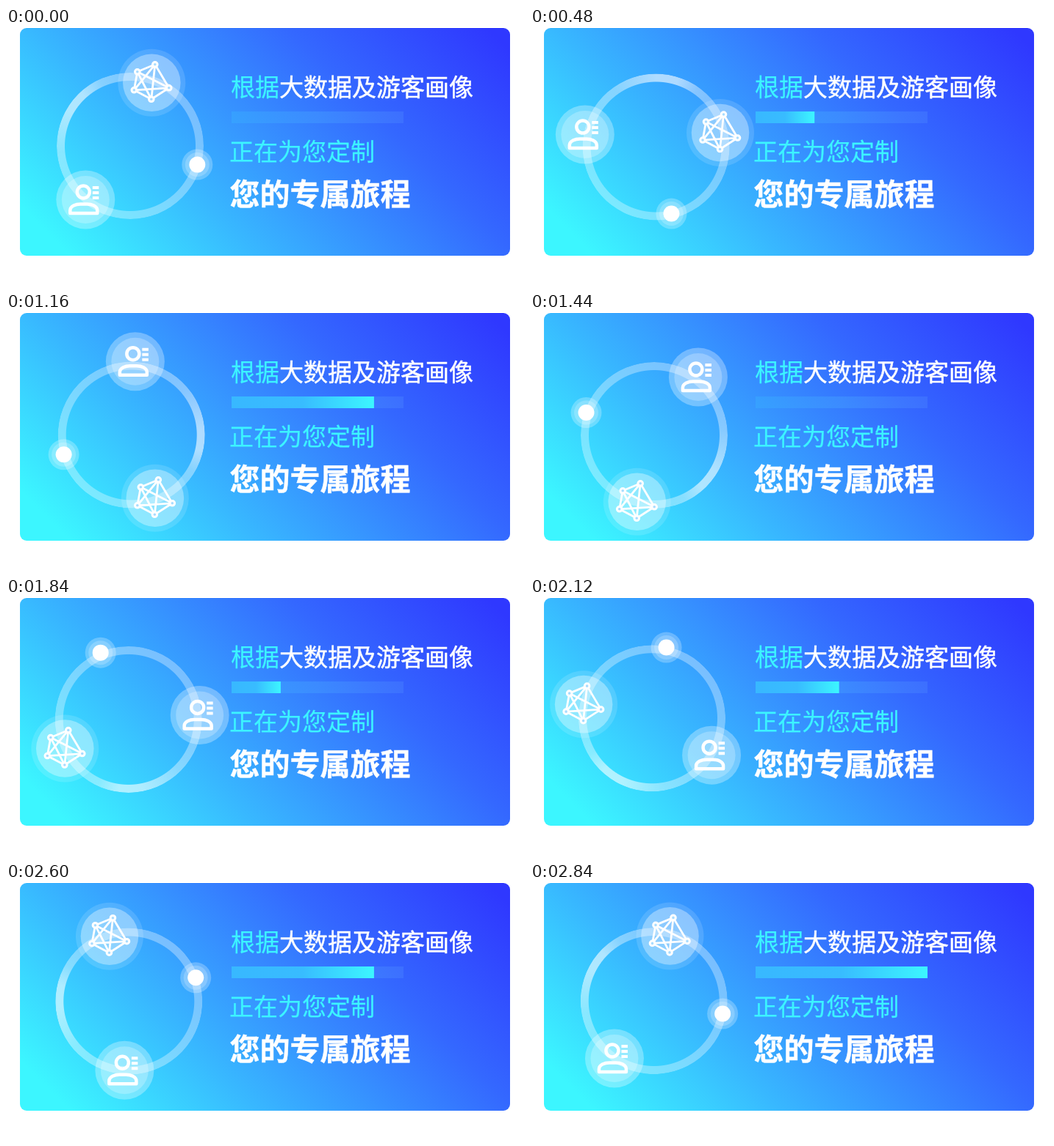
Write an HTML page that moves like this. It is 705x351 px and loops after 2880 ms.

```html
<!DOCTYPE html>
<html lang="zh">
<head>
<meta charset="utf-8">
<style>
  html, body { margin: 0; width: 100%; height: 100%; overflow: hidden; background: #fff; }
  #stage { position: relative; width: 705px; height: 351px; overflow: hidden; }
  #card {
    position: absolute; left: 19px; top: 0; width: 667px; height: 311px; border-radius: 9px;
    background: linear-gradient(45deg, #3cf6ff 7%, #38b8ff 33%, #3468ff 69%, #2f38ff 97%);
  }
  #ring {
    position: absolute; left: 68.5px; top: 60.5px; width: 200px; height: 200px;
    border-radius: 50%; transform-origin: 100px 103px;
    background: conic-gradient(#fff5 0 225deg, #fff6 265deg, #fff9 300deg, #fff9 318deg, #fff6 335deg, #fff5);
    -webkit-mask: radial-gradient(circle, #0000 88.5px, #000 89.5px);
    mask: radial-gradient(circle, #0000 88.5px, #000 89.5px);
  }
  svg { position: absolute; left: 0; top: 0; }
  text {
    font-family: "Noto Sans CJK SC", "Noto Sans CJK", "Noto Sans CJK JP", sans-serif;
    font-size: 33px; fill: #fff; stroke: #fff; stroke-width: .5px;
  }
  .cyan { fill: #3cf4ff; stroke: #3cf4ff; stroke-width: .25px; }
  .title { font-size: 41px; font-weight: 700; }
  .line { fill: none; stroke: #fff; stroke-linejoin: round; }
</style>
</head>
<body>
<div id="stage">
  <div id="card"></div>
  <div id="ring"></div>
  <svg width="705" height="351" viewBox="0 0 705 351">
    <defs>
      <linearGradient id="track">
        <stop offset="0" stop-color="#38b8ff" stop-opacity=".32"/>
        <stop offset=".5" stop-color="#48a8ff" stop-opacity=".36"/>
        <stop offset="1" stop-color="#508cff" stop-opacity=".32"/>
      </linearGradient>
      <linearGradient id="fill">
        <stop offset="0" stop-color="#38b8ff"/>
        <stop offset=".5" stop-color="#38bcff"/>
        <stop offset="1" stop-color="#3cf6ff"/>
      </linearGradient>
    </defs>

    <g id="network" fill="#fff">
      <circle r="46" fill-opacity=".13"/>
      <circle r="39.3" fill-opacity=".34"/>
    </g>
    <g id="person" fill="#fff">
      <circle r="40" fill-opacity=".3"/>
      <circle r="32.5" fill-opacity=".24"/>
      <g class="line" stroke-width="4.5">
        <circle cx="-3" cy="-10.5" r="8.5"/>
        <path d="M-21 18.5V14.5C-21 8.5-13 6-7 6H2C8 6 16 8.5 16 14.5V18.5Z"/>
        <path d="M9.5-16.5h8.5m-8.5 7h8.5m-8.5 7h8.5" stroke-width="4"/>
      </g>
    </g>
    <g id="dot" fill="#fff">
      <circle r="21" fill-opacity=".25"/>
      <circle r="16.5" fill-opacity=".2"/>
      <circle r="11"/>
    </g>

    <rect x="307" y="114" width="234" height="16" fill="url(#track)"/>
    <rect id="bar" x="307" y="114" width="0" height="16" fill="url(#fill)"/>
    <text x="306" y="92.5"><tspan class="cyan">根据</tspan>大数据及游客画像</text>
    <text x="304" y="181" class="cyan">正在为您定制</text>
    <text x="304.5" y="241.5" class="title">您的专属旅程</text>
  </svg>
</div>
<script>
const FRAME = 40, FRAMES = 72, BAR_FRAMES = 36, BAR_WIDTH = 234;
const byId = id => document.getElementById(id);

// Network icon: every node is joined to every other one.
const nodes = [[4.5, -25], [-19.5, -15], [-24, 10], [-.5, 22.5], [23.5, 7]];
const links = nodes.flatMap((a, i) => nodes.slice(i + 1).map(b => `M${a}L${b}`)).join('');
byId('network').insertAdjacentHTML('beforeend',
  `<path class="line" stroke-width="2.8" d="${links}"/>` +
  nodes.map(([x, y]) =>
    `<circle cx="${x}" cy="${y}" r="3.3" fill="#a8dcff" stroke="#fff" stroke-width="3"/>`).join(''));

// Each badge stays upright on its orbit; sway adds a small second harmonic.
const orbits = [
  { el: byId('network'), center: [169.4, 164.6], arm: [26.3, -91.5], sway: [2.6, 1.7] },
  { el: byId('person'), center: [168.6, 161], arm: [-60.3, 73.5], sway: [0, 0] },
  { el: byId('dot'), center: [168.4, 161.3], arm: [91.9, 25.3], sway: [0, 0] }
];

const rotate = ([x, y], a) =>
  [x * Math.cos(a) - y * Math.sin(a), x * Math.sin(a) + y * Math.cos(a)];

function draw(time) {
  const step = Math.floor(time / FRAME + 1e-3) % FRAMES;
  const angle = step / FRAMES * 2 * Math.PI;
  byId('ring').style.transform = `rotate(${angle}rad)`;
  for (const { el, center, arm, sway } of orbits) {
    const a = rotate(arm, angle), s = rotate(sway, 2 * angle);
    el.setAttribute('transform', `translate(${center[0] + a[0] + s[0]} ${center[1] + a[1] + s[1]})`);
  }
  byId('bar').setAttribute('width', BAR_WIDTH * (step % BAR_FRAMES) / (BAR_FRAMES - 1));
}

function tick() {
  draw(performance.now() - start);
  requestAnimationFrame(tick);
}
const start = performance.now();
draw(0);
requestAnimationFrame(tick);
</script>
</body>
</html>
```
